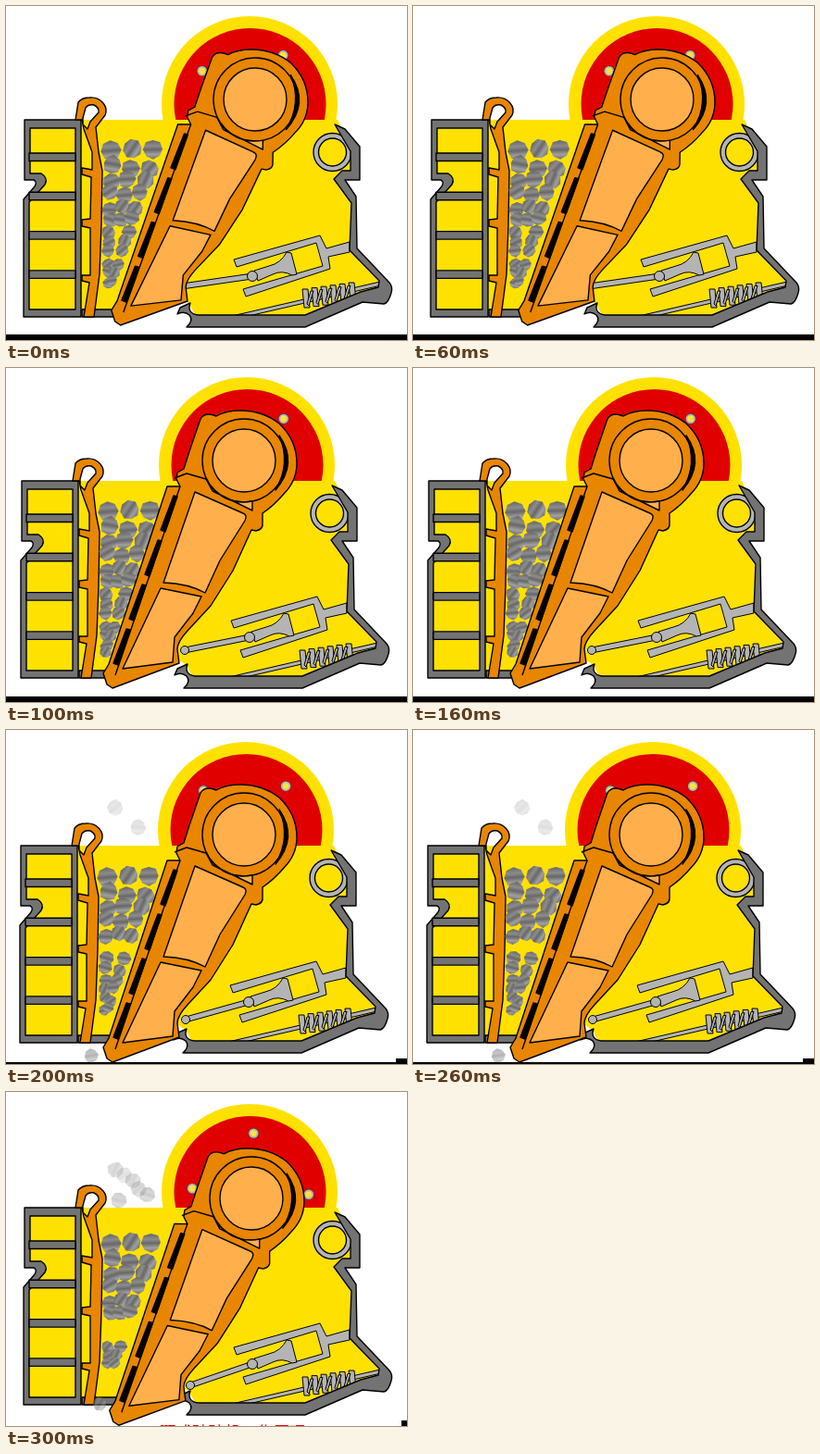
Recreate the animation shown at these times as an HTML page. Size 433 by 361 pixels, loop 400 ms.

```html
<!DOCTYPE html>
<html lang="en">
<head>
<meta charset="utf-8">
<title>Jaw crusher</title>
<style>
html, body { margin: 0; width: 100%; height: 100%; overflow: hidden; background: #fff; }
svg { display: block; width: 433px; height: 361px; }
.line { stroke: #000; stroke-width: 1.4; stroke-linejoin: round; }
.thin { stroke-width: 1; }
.dark { fill: #737373; }
.steel { fill: #b4b4b4; }
.orange { fill: #e88600; }
.pale { fill: #ffb04c; }
.yellow { fill: #ffe100; }
</style>
</head>
<body>
<svg viewBox="0 0 433 361">
  <defs>
    <linearGradient id="stone">
      <stop offset="0" stop-color="#666"/>
      <stop offset="0.3" stop-color="#8c8c8c"/>
      <stop offset="0.5" stop-color="#686868"/>
      <stop offset="0.75" stop-color="#a0a0a0"/>
      <stop offset="1" stop-color="#707070"/>
    </linearGradient>
    <clipPath id="upper"><path d="M160 0H370V123H160Z"/></clipPath>
  </defs>
  <path id="bar"/>
  <text id="caption" x="166" y="374" font-size="17.5" fill="#e00000" font-family="'Noto Sans CJK SC','Noto Sans CJK',sans-serif">颚式破碎机工作原理</text>
  <g id="base">
    <g clip-path="url(#upper)">
      <circle class="yellow" cx="263" cy="106" r="95"/>
      <circle fill="#e00000" cx="263.5" cy="106" r="82"/>
      <g id="bolts"></g>
    </g>
    <path class="yellow" d="M22 125H80V123H358L374 158V180L358 187L376 213L374 264L405 298L400 306L324 336H205L198 322L188 316L120 330H22V210L44 190L26 184Z"/>
    <g class="line">
      <path class="dark" d="M82 328H122V336H82Z"/>
      <path class="dark" fill-rule="evenodd" d="M20 123H81V336H19V209L31 195Q34 190 30 188H20ZM26 132V181H38Q46 186 42 193L25 212V328H75V132Z"/>
      <g id="shelves" class="dark"></g>
      <path class="orange" fill-rule="evenodd" d="M75 123L78 104Q82 99 90 99Q99 98 105 105Q110 111 107 118L97 131L100 158L104 178L103 236L101 290L95 336H84L90 299L82 297V291H91L91 240L82 238V231L91 230L92 185L82 182V175L93 177V158L84 133L82 123ZM83 128V121L86 110Q89 106 95 107Q101 110 100 115L91 125L88 133Z"/>
      <circle class="steel" cx="352.5" cy="158" r="20.5"/>
      <circle class="yellow" cx="352.5" cy="158" r="15"/>
      <g class="steel thin">
        <path d="M244 335L404 298L405 302L262 335Z"/>
        <g id="spring"></g>
        <path d="M246 274L339 248L346 262L371 255V266L348 271L350 284L259 314L256 306L342 281L335 256L249 282Z"/>
        <path d="M268 286L284 281Q297 278 303 266L308 267L314 290L309 291Q298 285 288 290L272 297Z"/>
      </g>
      <path class="dark" d="M355 128L366 133L382 152V188H366L378 206L379 262L414 299Q418 304 416 310Q413 321 408 322L385 320L323 347H195Q203 340 198 334Q192 329 185 333L188 326L199 321Q195 332 207 334H323L383 309L402 304L403 297L371 264L373 213L354 187L363 178H372V157Z"/>
    </g>
  </g>
  <g id="rocks" fill="url(#stone)"></g>
  <g class="line">
    <g id="link" class="steel thin"></g>
    <g id="jaw">
      <path class="orange" d="M-47 -45Q-42 -53 -30 -48Q-20 -54 -4 -54Q20 -54 38 -40Q57 -22 57 3Q57 22 43 36Q33 48 20 57V68Q21 74 13 76L8 75L-12 119L-36 157L-61 184Q-72 196 -72 204L-70 219L-142 246L-148 242L-152 230L-146 220L-83 28H-69L-73 20L-72 13L-65 9L-59 -10Z"/>
      <g id="slots"></g>
      <path fill="none" d="M-75 19L-62 14L-41 20M-69 28L-139 232"/>
      <circle fill="none" r="45"/>
      <path d="M38 -27Q59 3 34 32Q51 3 38 -27Z"/>
      <path class="pale" d="M-41 20A45 45 0 0 0 9 44V54L-34 33Z"/>
      <circle class="pale" r="34"/>
      <path class="pale" d="M-53 34L-1 57Q4 59 1 65L-26 108L-42 143Q-60 133 -87 132Z"/>
      <path class="pale" d="M-90 138L-46 147L-55 165L-75 191L-77 218L-131 225Z"/>
    </g>
  </g>
</svg>
<script>
const $ = id => document.getElementById(id);
const lerp = (a, b, t) => a + (b - a) * t;
const path = d => `<path d="${d}"/>`;
const disc = (x, y, r, extra = '') => `<circle cx="${x}" cy="${y}" r="${r}" ${extra}/>`;
const repeat = (n, part) => Array.from({ length: n }, (_, i) => part(i)).join('');

// Seeded random number between a and b.
function random(seed) {
  return (a, b) => lerp(a, b, (seed = seed * 16807 % 2147483647) / 2147483647);
}

// Each pose lasts 100 ms: frame offset, jaw pivot and tilt, flywheel angle,
// rod end, depth of the stone pile and its gap, stones falling in and out.
const poses = [
  { dx: 0, dy: 0, jaw: [269, 101, 0.8], wheel: -56, rod: [190, 303], pile: [157, 298], bar: 'M0 355H433V361H0Z' },
  { dx: -3, dy: -1, jaw: [257, 100, 0], wheel: -52, rod: [193, 305], pile: [156, 310], bar: 'M0 355H433V361H0Z' },
  { dx: -4, dy: 2, jaw: [257, 113, 0], wheel: -48, rod: [194, 313], pile: [160, 302], gap: [229, 246],
    falling: 2, out: [92, 352], bar: 'M0 359H421V355H433V361H0Z' },
  { dx: 0, dy: 2, jaw: [265, 115, 0.3], wheel: -87, rod: [199, 317], pile: [165, 302], gap: [245, 266],
    falling: 6, out: [101, 337], bar: 'M427 355H433V361H427Z' }
];

function stone(x, y, r, alpha, rnd) {
  const points = repeat(8, i => {
    const a = i * Math.PI / 4, d = r * rnd(0.92, 1.08);
    return `${(d * Math.cos(a)).toFixed(1)},${(d * Math.sin(a)).toFixed(1)} `;
  });
  return `<polygon points="${points}" opacity="${alpha}" transform="translate(${x} ${y}) rotate(${rnd(20, 110)})"/>`;
}

// The pile narrows and its stones shrink towards the outlet.
function stones({ dx, dy, pile: [top, bottom], gap = [0, 0], falling = 0, out }) {
  const rnd = random(41);
  let html = '', r;
  for (let y = top; y < bottom; y += 1.55 * r) {
    r = lerp(10.5, 6, (y - top) / (bottom - top));
    if (y > gap[0] && y < gap[1]) continue;
    const left = 104 + dx + r, right = 170 + dx - 0.35 * (y - dy - 157) - r;
    const n = Math.max(2, Math.round((right - left) / (1.75 * r)) + 1);
    html += repeat(n, i => stone(lerp(left, right, i / (n - 1)) + rnd(-1, 1), y + rnd(-3, 3), r, 1, rnd));
  }
  html += repeat(falling, i => stone(lerp(118, 158, i * 0.62 % 1), 84 + i * 21 % 36, 8.5, rnd(0.2, 0.45), rnd));
  return out ? html + stone(...out, 7.5, 0.5, rnd) : html;
}

function rod({ dx, dy, rod: [x, y] }) {
  const ex = 266 + dx, ey = 292 + dy;
  return path(`M${x} ${y - 3}L${ex} ${ey - 3}V${ey + 3}L${x} ${y + 3}Z`) + disc(x, y, 4.5) + disc(ex, ey, 5.5);
}

function bolts({ wheel }) {
  return repeat(4, i => {
    const a = (wheel + i * 90) * Math.PI / 180;
    const x = 264 + 63 * Math.cos(a), y = 105.5 + 63 * Math.sin(a);
    return disc(x, y, 5.8, 'fill="#444"') + disc(x, y, 5.2, 'class="steel"') + disc(x, y, 3.4, 'fill="#ffe23c"');
  });
}

$('shelves').innerHTML = repeat(4, i => path(`M25 ${159 + 42.3 * i}H75v8.5H25Z`));
$('spring').innerHTML = repeat(6, i => path(`M${320 + i * 10} ${306 - i * 1.4}h6l2 20h-6Z`)) +
  repeat(5, i => path(`M${325 + i * 10} ${322 - i * 1.4}l4 -14h3l-5 16Z`));
$('slots').innerHTML = repeat(4, i => {
  const x = -76 - 17 * i, y = 38 + 48 * i;
  return path(`M${x} ${y}l4 1l-13 38l-5 -2Z`);
});

const scenes = poses.map(p => ({ rocks: stones(p), link: rod(p), bolts: bolts(p) }));

let shown = -1;
function draw(time) {
  const k = Math.floor(time / 100) % poses.length;
  if (k === shown) return;
  shown = k;
  const { dx, dy, jaw: [x, y, tilt], bar } = poses[k];
  $('base').setAttribute('transform', `translate(${dx} ${dy})`);
  $('jaw').setAttribute('transform', `translate(${x} ${y}) rotate(${tilt})`);
  $('bar').setAttribute('d', bar);
  $('caption').setAttribute('visibility', k === 3 ? 'visible' : 'hidden');
  for (const [id, html] of Object.entries(scenes[k])) $(id).innerHTML = html;
}

const start = performance.now();
function tick() {
  draw(performance.now() - start);
  requestAnimationFrame(tick);
}
tick();
</script>
</body>
</html>
```
